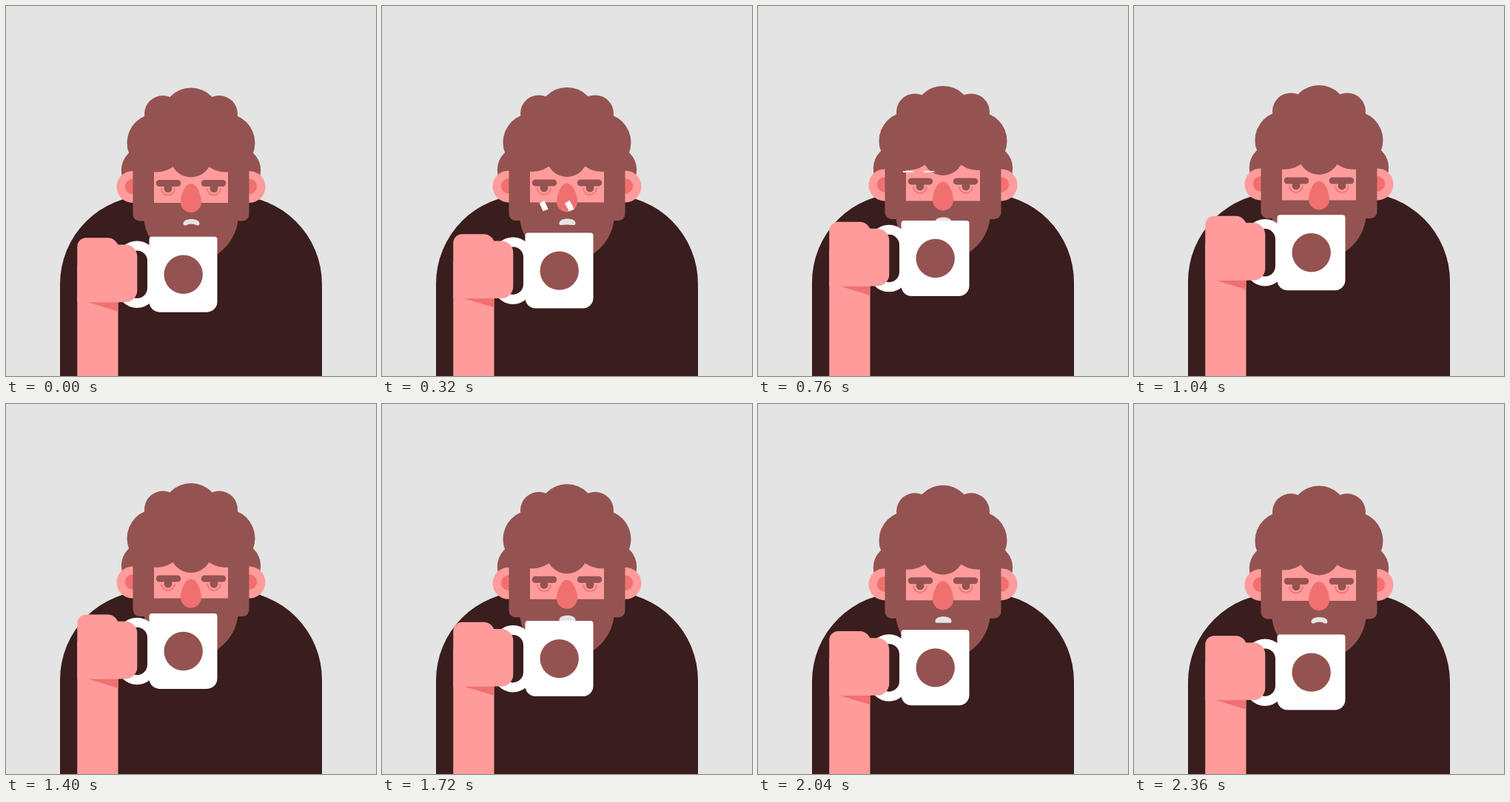
Recreate the animation shown at these times as an HTML page with a canvas. Size 500 by 500 pixels, loop 2400 ms.

```html
<!DOCTYPE html>
<html lang="en">
<head>
<meta charset="utf-8">
<title>Morning coffee</title>
<style>
  html, body { margin: 0; width: 100%; height: 100%; overflow: hidden; background: #e4e4e4; }
  canvas { display: block; width: 500px; height: 500px; }
</style>
</head>
<body>
<canvas id="stage"></canvas>
<script>
const canvas = document.getElementById('stage');
const ctx = canvas.getContext('2d');
const ratio = window.devicePixelRatio || 1;
canvas.width = canvas.height = 500 * ratio;

const LOOP = 2400, STEP = 40;
const C = {
  back: '#e4e4e4', shirt: '#3a1d1d', hair: '#945351',
  skin: '#ff9c9b', blush: '#f07070', white: '#ffffff'
};

const clamp = x => Math.min(1, Math.max(0, x));
const ease = x => (1 - Math.cos(Math.PI * clamp(x))) / 2;

function disc(x, y, r, color) {
  ctx.fillStyle = color;
  ctx.beginPath();
  ctx.arc(x, y, r, 0, Math.PI * 2);
  ctx.fill();
}

function box(x, y, w, h, r, color) {
  ctx.fillStyle = color;
  ctx.beginPath();
  ctx.roundRect(x, y, w, h, r);
  ctx.fill();
}

function shape(d, color) {
  ctx.fillStyle = color;
  ctx.fill(new Path2D(d));
}

// Calls draw for both sides of the face, mirrored about x = 250.
function bothSides(draw) {
  for (const side of [-1, 1]) draw(dx => 250 + side * dx);
}

function lifted(dy, draw) {
  ctx.save();
  ctx.translate(0, -dy);
  draw();
  ctx.restore();
}

function drawBody() {
  box(73, 256, 354, 300, [120, 120, 0, 0], C.shirt);
}

function drawHead(lift) {
  bothSides(x => {
    disc(x(62.5), 222, 31.7, C.hair);
    disc(x(79), 244.5, 21.5, C.skin);
    disc(x(79), 244, 10.2, C.blush);
  });
  box(171.5, 200, 157, 90.5, [0, 0, 9, 9], C.hair);
  disc(250, 282, 64, C.hair);
  ctx.fillStyle = C.skin;
  ctx.fillRect(200, 200, 100, 66);

  bothSides(x => {
    disc(x(38), 146, 25, C.hair);
    disc(x(47), 185, 39.5, C.hair);
  });
  disc(250, 149.5, 39, C.hair);
  disc(250, 203.5, 28, C.hair);
  ctx.fillRect(200, 146, 100, 60);

  bothSides(x => {
    disc(x(31), 246.5, 5.5, C.hair);
    ctx.strokeStyle = C.blush;
    ctx.lineWidth = 1.6;
    ctx.beginPath();
    ctx.arc(x(31), 246.5, 9, 0, Math.PI);
    ctx.stroke();
    box(x(30.5) - 16.75, 235, 33.5, 9, 4.5, C.hair);
  });
  shape('M250 240C258 240 264 255 264 265A14 14 0 0 1 236 265C236 255 242 240 250 240Z', C.blush);

  const frown = 4 * clamp(1 - lift / 0.2);
  shape(`M239.5 294C239.5 286 261.5 286 261.5 294Q261.5 297 258 296.5
    Q250.5 ${296.5 - frown} 243 296.5Q239.5 297 239.5 294Z`, C.back);
}

function bezier(a, b, c, d, u) {
  const v = 1 - u;
  return v * v * v * a + 3 * v * v * u * b + 3 * v * u * u * c + u * u * u * d;
}

function drawSteam(t) {
  const tail = ease((t - 400) / 395), tip = ease((t - 195) / 400);
  if (tip <= tail) return;
  ctx.strokeStyle = C.white;
  ctx.lineWidth = 7.5 + 6.5 * clamp((t - 320) / 440);
  for (const [start, end] of [[221, 203], [256, 231.5]]) {
    ctx.beginPath();
    for (let i = 0; i <= 24; i++) {
      const u = tail + (tip - tail) * i / 24;
      ctx.lineTo(bezier(start, start - 7, end, end, u), bezier(276, 257, 250, 223, u));
    }
    ctx.stroke();
  }
}

function drawMug() {
  ctx.strokeStyle = C.white;
  ctx.lineWidth = 13;
  ctx.beginPath();
  ctx.roundRect(156.5, 324, 41, 77.5, 20.5);
  ctx.stroke();
  box(193.5, 311.7, 92, 102, [4, 4, 14, 14], C.white);
  disc(239.7, 362.7, 26.2, C.hair);
}

function drawHand() {
  ctx.fillStyle = C.skin;
  ctx.fillRect(96.3, 350, 55.2, 200);
  shape('M110 400H151.5V412.7Z', C.blush);
  box(96.3, 313.3, 56, 87, [12, 15, 0, 0], C.skin);
  box(120, 322.5, 57.3, 77.7, [0, 16, 16, 0], C.skin);
}

function render(now) {
  const t = Math.floor((now % LOOP) / STEP) * STEP;
  const lift = (1 - Math.cos(2 * Math.PI * t / LOOP)) / 2;
  ctx.setTransform(ratio, 0, 0, ratio, 0, 0);
  ctx.fillStyle = C.back;
  ctx.fillRect(0, 0, 500, 500);
  lifted(3.7 * lift, () => {
    drawBody();
    drawHead(lift);
  });
  drawSteam(t);
  lifted(30.8 * lift, () => {
    drawMug();
    drawHand();
  });
}

const began = performance.now();
function tick() {
  render(performance.now() - began);
  requestAnimationFrame(tick);
}
tick();
</script>
</body>
</html>
```
